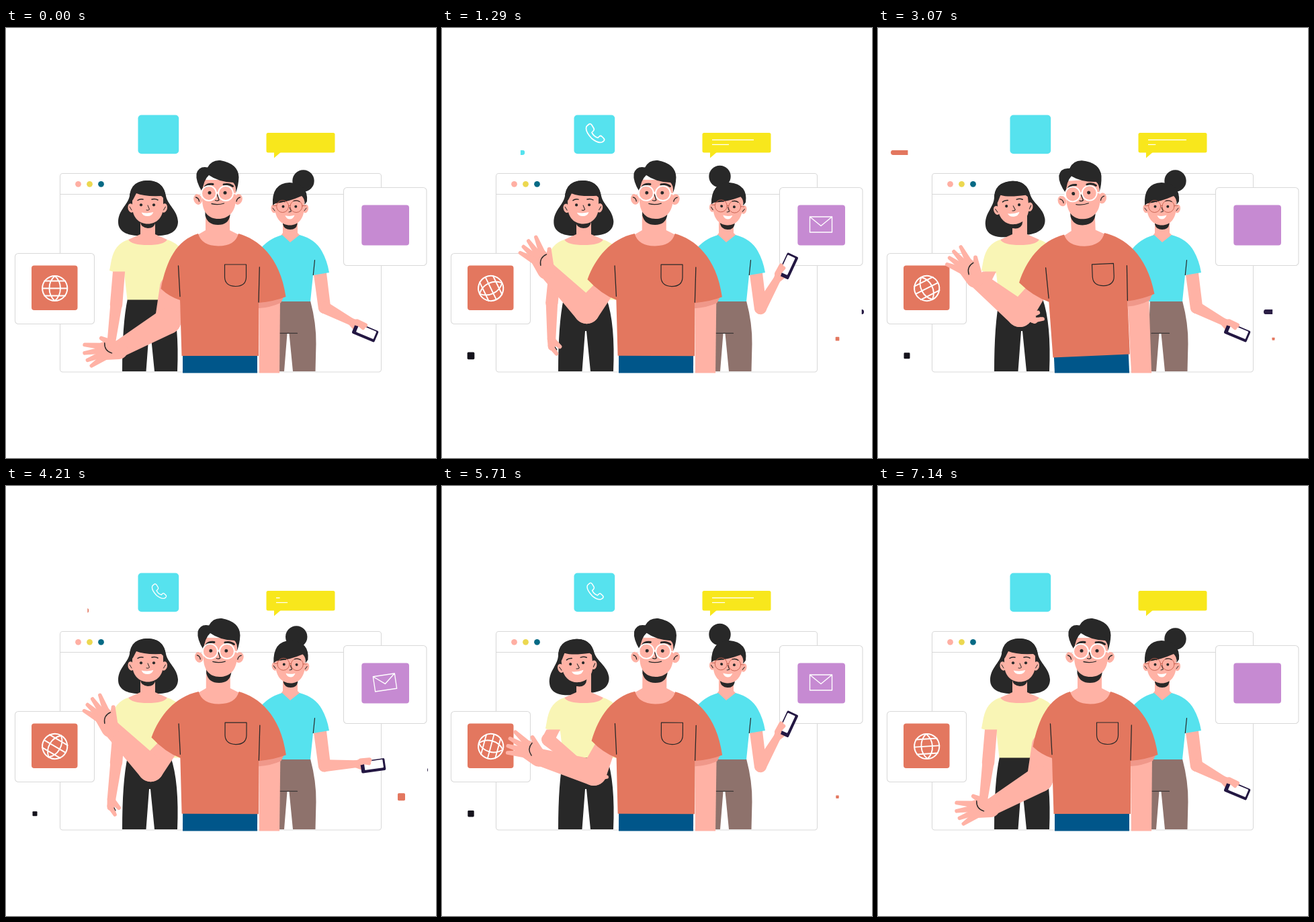
An HTML page with a canvas that plays this animation: 640 px wide and 640 px high, repeating every 7210 ms.

```html
<!DOCTYPE html>
<html lang="en">
<head>
<meta charset="utf-8">
<title>Team greeting</title>
<style>
html, body { margin: 0; width: 100%; height: 100%; overflow: hidden; background: #fff; }
canvas { display: block; width: 100vmin; height: 100vmin; }
</style>
</head>
<body>
<canvas id="stage" width="640" height="640"></canvas>
<script>
const ctx = document.getElementById('stage').getContext('2d');
const LOOP = 7210, STEP = LOOP / 101;
const SKIN = '#ffb2a5', DARK = '#282828', ORANGE = '#e3775f', CYAN = '#56e2ee',
  PURPLE = '#c68ad2', YELLOW = '#f8e71c', NAVY = '#231742', EDGE = '#d9d9d9', RIM = '#c4604f';

const rad = d => d * Math.PI / 180;
const mix = (a, b, u) => a + (b - a) * u;
const mixPt = (a, b, u) => [mix(a[0], b[0], u), mix(a[1], b[1], u)];
const clamp = u => Math.max(0, Math.min(1, u));
const smooth = u => { u = clamp(u); return u * u * (3 - 2 * u); };

// Eased interpolation through time, value, time, value, ...
function key(t, k) {
  if (t <= k[0]) return k[1];
  for (let i = 2; i < k.length; i += 2)
    if (t < k[i]) return mix(k[i - 1], k[i + 1], smooth((t - k[i - 2]) / (k[i] - k[i - 2])));
  return k[k.length - 1];
}

function fill(path, color) {
  ctx.fillStyle = color;
  ctx.fill(new Path2D(path));
}
function line(path, color = DARK, width = 1.2) {
  ctx.strokeStyle = color;
  ctx.lineWidth = width;
  ctx.stroke(new Path2D(path));
}
function dot(x, y, r, color) { oval(x, y, r, r, color); }
function oval(x, y, rx, ry, color, turn = 0) {
  ctx.fillStyle = color;
  ctx.beginPath();
  ctx.ellipse(x, y, rx, ry, rad(turn), 0, 7);
  ctx.fill();
}
function ring(x, y, r, color, width) {
  ctx.strokeStyle = color;
  ctx.lineWidth = width;
  ctx.beginPath();
  ctx.arc(x, y, r, 0, 7);
  ctx.stroke();
}
function box(x, y, w, h, r, color, edge) {
  ctx.beginPath();
  ctx.roundRect(x, y, w, h, r);
  if (color) { ctx.fillStyle = color; ctx.fill(); }
  if (edge) { ctx.strokeStyle = edge; ctx.lineWidth = 1.1; ctx.stroke(); }
}
function limb(a, b, ra, rb, color = SKIN) {
  const n = Math.atan2(b[1] - a[1], b[0] - a[0]) + Math.PI / 2;
  ctx.fillStyle = color;
  ctx.beginPath();
  ctx.arc(a[0], a[1], ra, n, n + Math.PI);
  ctx.arc(b[0], b[1], rb, n + Math.PI, n);
  ctx.fill();
}
function group(x, y, turn, scale, draw) {
  ctx.save();
  ctx.translate(x, y);
  ctx.rotate(rad(turn));
  ctx.scale(scale, scale);
  draw();
  ctx.restore();
}
function around(x, y, turn, dx, dy, draw) {
  group(x + dx, y + dy, turn, 1, () => { ctx.translate(-x, -y); draw(); });
}
function smile(x, y, w) {
  fill(`M${x - w} ${y}q${w} 2 ${2 * w} -.5q-2 6 ${-w} 6q${2 - w} 0 ${-w} -5.5z`, '#fff');
}

function browser() {
  box(80.5, 216.5, 478, 295.5, 4, '#fff', EDGE);
  line('M80.5 247.5H558.5', EDGE, 1);
  dot(107.5, 232.3, 4.4, '#ffafa3');
  dot(124.5, 232.3, 4.4, '#ecd850');
  dot(141.5, 232.3, 4.4, '#056a85');
}

function cards(t) {
  const c = t % (LOOP / 2);
  box(13.5, 335.5, 118, 105, 5, '#fff', EDGE);
  box(38, 353.5, 68.5, 66.5, 4, ORANGE);
  group(72.7, 387.5, t / LOOP * 360, 1, () => {
    ring(0, 0, 18.6, '#fff', 2);
    line('M-18 0H18M-15.5 -11H15.5M-15.5 11H15.5M0 -18.5C-11 -9 -11 9 0 18.5C11 9 11 -9 0 -18.5', '#fff', 1.9);
  });

  box(502.5, 237.5, 123.5, 116, 5, '#fff', EDGE);
  box(529.3, 263.5, 70.7, 60, 4, PURPLE);
  const mail = key(c, [250, 0, 640, 1, 2600, 1, 2930, 0]);
  if (mail > 0.01) {
    group(564, 292.5, key(c, [250, -20, 900, 0, 2450, 0, 2930, 14]), mail, () =>
      line('M-16.5 -11.5H16.5V11.5H-16.5ZM-16.5 -11.5L0 2L16.5 -11.5', '#fff', 1.4));
  }

  box(196.5, 129.5, 60.7, 57.7, 5, CYAN);
  const call = key(c, [250, 0, 760, 1, 2000, 1, 2500, 0]);
  if (call > 0.01) {
    group(228, 156.5, 0, call, () =>
      line('M-12 -11L-9 -13.5Q-7 -14.5 -5 -12L-2 -7Q-1 -5 -3 -3L-5 -1Q-2 5 4 7L6 5Q8 3 10 5L13 8Q14.5 10 12.500 12L10 13.5Q4 15.500 -5 8Q-13.500 -1 -13.500 -7Q-13.500 -10 -12 -11Z', '#fff', 1.7));
  }
}

function chat(t) {
  const c = t % (LOOP / 3);
  box(387.5, 156, 102, 29.5, 2.5, YELLOW);
  fill('M399 184V193.5L410 184Z', YELLOW);
  const back = clamp((c - 1290) / 1020);
  const top = c < 1290 ? 1 - (1 - clamp(c / 930)) ** 2 : (1 - back) ** 3.4;
  const low = c < 1290 ? smooth((c - 150) / 1100) : 1 - back ** 1.7;
  ctx.fillStyle = '#fff';
  ctx.fillRect(402, 165.8, 62 * top, 1.4);
  ctx.fillRect(402, 172.9, 25 * low, 1.2);
}

function wipeBar(x, y, w, h, from, to, color) {
  ctx.save();
  ctx.beginPath();
  ctx.rect(x + w * from, y, w * (to - from), h);
  ctx.clip();
  box(x, y, w, h, h / 2, color);
  ctx.restore();
}
function confetti(t) {
  const turn = t / LOOP * 5, n = Math.floor(turn) % 5, p = turn % 1;
  const to = smooth(p / 0.4), from = smooth((p - 0.53) / 0.425);
  if (to > from) {
    wipeBar(19, 181.7, 104.3, 7.3, from, to, [CYAN, PURPLE, ORANGE, '#d6001c', YELLOW][n]);
    wipeBar(574, 418.8, 54, 7.3, from, to, [NAVY, CYAN, '#2b1e45', ORANGE, '#3a205c'][n]);
  }
  const c = (t / LOOP * 3) % 1;
  const a = key(c, [0, 0, 0.28, 9, 0.618, 11, 0.752, 7, 0.95, 0]);
  const b = key(c, [0.12, 0, 0.278, 4, 0.618, 6, 0.752, 11, 0.96, 0]);
  if (a > 0.1) box(43 - a / 2, 487.8 - a / 2, a, a, a * 0.15, '#15131c');
  if (b > 0.1) box(588.5 - b / 2, 462.7 - b / 2, b, b, b * 0.15, ORANGE);
}

function leftWoman(t) {
  const hip = key(t % (LOOP / 2), [1240, 0, 1480, 1, 3130, 1, 3520, 0]);
  fill('M181 403Q173 440 173 511H208.5L213 451H215L221 511H255Q258 440 245 403Z', DARK);

  const head = draw => around(211, 310, -6 * hip, -5 * hip, 0.5 * hip, draw);
  head(() => fill('M211 227C195 227 186 236 184 250C181 264 167 271 167 289C167 303 181 309 197 309H227C243 309 256 303 256 288C255 271 241 264 238 250C236 236 227 227 211 227Z', DARK));
  fill('M200 280H222V307L240 315Q236 324 211 324Q186 324 182 315L200 307Z', SKIN);
  head(() => {
    fill('M200 282H222.5V289Q221 298 211 298Q201 297 200 289Z', DARK);
    oval(186, 268, 4.5, 6.8, SKIN, -12);
    oval(235.5, 268, 4.5, 6.8, SKIN, 12);
    fill('M188 246V266C188 282 198 291.5 211 291.5S234 282 234 266V246Z', SKIN);
    fill('M184.5 262Q180 227 211 227Q241 228 237.5 262Q236 253 231 250Q205 251 194 246Q190 255 184.5 262Z', DARK);
    dot(201, 263.3, 2.1, DARK);
    dot(220, 263.3, 2.1, DARK);
    line('M196 256.5Q199 254 204 255M217 255Q222 253.5 226 256', DARK, 1.5);
    line('M211 264L213.5 270Q212 272 209 271M184 266l3 5M237.5 266l-3 5', DARK, 1);
    smile(210.5, 274.5, 8.8);
  });
  fill('M182 315Q162 321 157 345L154 361Q164 365 176 365L180.5 404.5H262V330Q253 319 240 315Q235 323 211 323Q187 323 182 315Z', '#f9f5b5');

  const elbow = mixPt([164, 412], [158, 377.5], hip);
  const wrist = mixPt([157, 466], [222, 429], hip);
  ctx.save();
  ctx.beginPath();
  ctx.rect(140, 362.5, 120, 150);
  ctx.clip();
  limb([168.5, 357], elbow, 9, 9.2);
  limb(elbow, wrist, mix(8.7, 10, hip), 6.3);
  group(...wrist, mix(0, -68, hip), 1, () => {
    limb([0, 0], [-1, 12], 6.3, 5.5);
    limb([-2, 10], [5, 23], 4.5, 2.8);
    limb([2, 3], [11, 13], 4.5, 3);
    line('M4 13L6 17', DARK, 1.3);
  });
  ctx.restore();
}

function rightWoman(t) {
  const up = key(t % (LOOP / 2), [390, 0, 930, 1, 2330, 1, 2830, 0]);
  fill('M405 406H453Q462 440 461.5 470L460.5 511H427L421.5 455H418.5L414 511H400Z', '#8e726c');
  line('M407 454.3H433.5', DARK, 1.1);

  const bun = mixPt([442.5, 227.5], [413.5, 221], up);
  dot(bun[0], bun[1] - 3 * up * (1 - up), 16.2, DARK);
  fill('M412 280H434V305L438 309L423 321L409 309L412 305Z', SKIN);
  around(423, 300, 3.5 * up, 1.5 * up, 0, () => {
    fill('M412 284H433.5V292Q432 300 423 300Q414 300 412 292Z', DARK);
    oval(398.5, 269, 4, 6.3, SKIN, -10);
    oval(446, 269, 4, 6.3, SKIN, 10);
    fill('M400 248V268C401 284 410 293.5 422.5 293.5S443 284 444 268V248Z', SKIN);
    fill('M397 264Q395 231 422 230Q450 231 448 258L444.5 263Q445 254 440 250Q420 259 401 261Z', DARK);
    dot(412.5, 265.7, 2, DARK);
    dot(431.3, 265.7, 2, DARK);
    ring(411.7, 265.5, 9, RIM, 0.9);
    ring(432, 265.5, 9, RIM, 0.9);
    line('M420.7 264.5h2.3M398 264.5h4.8M441 264.5h5', RIM, 0.9);
    line('M408 259Q411 257.5 415 258.5M428 257.5Q433 256 437 258.5', DARK, 1.3);
    line('M422 267L424.5 273L421 274M397 268l3 4M447 268l-3 4', DARK, 1);
    smile(422.5, 279, 7);
  });

  const elbow = [474, 416 + up], turn = mix(28, -60, up), len = mix(45, 49, up);
  const wrist = [elbow[0] + len * Math.cos(rad(turn)), elbow[1] + len * Math.sin(rad(turn))];
  limb([467, 362], elbow, 9.6, 9.2);
  limb(elbow, wrist, 9, 5.5);
  group(...wrist, turn, 1, () => {
    limb([0, 0], [10, 1], 5.5, 8.5);
    group(25.5, 4, -5, 1, () => {
      box(-18, -9, 36.5, 18, 2, NAVY);
      box(-12.5, -7.3, 28, 12.2, 1, '#fff');
    });
    limb([8, -3], [21, -5], 5, 3.4);
    limb([12, -3], [20, 0], 4, 2.8);
  });

  fill('M411 308L423 319L437 308Q460 314 470 332Q478 346 481 364L457 368L453 407H400L376 332Q389 314 411 308Z', CYAN);
  line('M459.5 345.5L457.3 367.5');
}

function manHand() {
  const tips = [[-45, -7.5], [-45, 4], [-41, 13.7], [-35.5, 21.5]];
  limb([2, 0], [-17, 1], 12.5, 12.5);
  tips.forEach((tip, i) => limb([-17, -5 + i * 4.6], tip, 5, 2.6));
  limb([-3, -7], [-22, -16.5], 6, 2.8);
  line('M-17.5 -10Q-18 1 -7.5 4', DARK, 1.3);
}

function manHead(blink) {
  fill('M296.5 268H333.5V279Q331 293 315.5 293Q300 293 296.5 279Z', DARK);
  oval(285.5, 255, 6.2, 8, SKIN, -15);
  oval(345.5, 255, 6.2, 8, SKIN, 15);
  fill('M292 226V254C292 274 301 284 316 284S342 274 342 254V226Z', SKIN);
  fill('M292 244Q282 228 283.5 217Q287 205 300 207.5Q306 196 319 197Q346 202 346.5 222Q346 235 342 245Q343 234 338 230Q316 229 302 219Q294 226 292 244Z', DARK);
  line('M296.5 236Q300 231.5 308 232.5M324 233Q332 231 337.5 235.5', DARK, 3);
  if (blink) line('M299.5 245.5h6M323 245.5h6', DARK, 1.4);
  else {
    dot(303, 245.3, 2.5, DARK);
    dot(326, 245.3, 2.5, DARK);
  }
  ring(302, 246, 11, '#fff', 1.9);
  ring(327, 246, 11, '#fff', 1.9);
  line('M313 245h3M286 247l5 -1M338 246l5 1', '#fff', 1.7);
  line('M314.5 248L317 256Q315 258 311.5 256.5M306 261.5Q315 264 324.5 261M282.5 252Q287 253 287.5 258M348.5 252Q344 253 343 258', DARK, 1.3);
}

function man(t) {
  const up = key(t, [300, 0, 1050, 1, 5400, 1, 6120, 0]);
  const sway = key(t, [300, 0, 1050, 0.2, 1290, 0.2, 2900, -2.5, 3200, -2.5, 4210, 0.2, 5070, 1, 6120, 0]);
  ctx.save();
  ctx.beginPath();
  ctx.rect(0, 0, 640, 513.5);
  ctx.clip();
  around(318, 513, sway, 0, 0, () => {
    // Waving arm, behind the sleeve
    const elbow = mixPt([241, 436], [215, 421], up);
    const turn = mix(150, 225, up) + 1.5 * sway * up;
    const wrist = [elbow[0] + 87 * Math.cos(rad(turn)), elbow[1] + 87 * Math.sin(rad(turn))];
    limb([244, 385], elbow, 15, 19.5);
    limb(elbow, wrist, 19.5, 12.5);
    group(...wrist, mix(0, 63, up) + 1.5 * sway * up, 1.08, manHand);

    fill('M376 400H408L407 520H377Z', SKIN);
    fill('M376 406L414 399L409 409Q394 416 376 417Z', '#f0988a');
    fill('M263 486H374V522H263Z', '#00568a');
    fill('M297 262H333V301L347 308Q344 326 316 326Q288 326 285 308L297 301Z', SKIN);

    const cuff = mixPt([230.5, 388], [216, 374.5], up);
    const neck = mixPt([254, 316], [250, 314], up);
    const shoulder = mixPt([239, 345], [228, 342], up);
    const hem = mixPt([243, 400], [236, 396], up);
    fill(`M286 306C${neck} ${shoulder} ${cuff}Q${hem} 259 405L261.5 488H376V409Q399 407 416.5 400C408 340 375 314 346 306Q341 324.5 316 324.5Q291 324 286 306Z`, ORANGE);
    line('M256.5 354L259 399.5M377.3 356L376 408', DARK, 1.3);
    line('M325.5 352H357.5V371Q357 384.5 341.5 384.5Q326 384 325.5 371Z', DARK, 1.2);
    around(316, 300, sway * 0.6, 0.8 * up, 0, () => manHead(t > 6210 && t < 6390));
  });
  ctx.restore();
}

function draw(t) {
  ctx.fillStyle = '#fff';
  ctx.fillRect(0, 0, 640, 640);
  ctx.lineCap = 'round';
  ctx.lineJoin = 'round';
  browser();
  cards(t);
  chat(t);
  confetti(t);
  leftWoman(t);
  rightWoman(t);
  man(t);
}

function tick() {
  const t = performance.now() % LOOP;
  draw(Math.floor((t + 3) / STEP) % 101 * STEP);
  requestAnimationFrame(tick);
}
tick();
</script>
</body>
</html>
```
